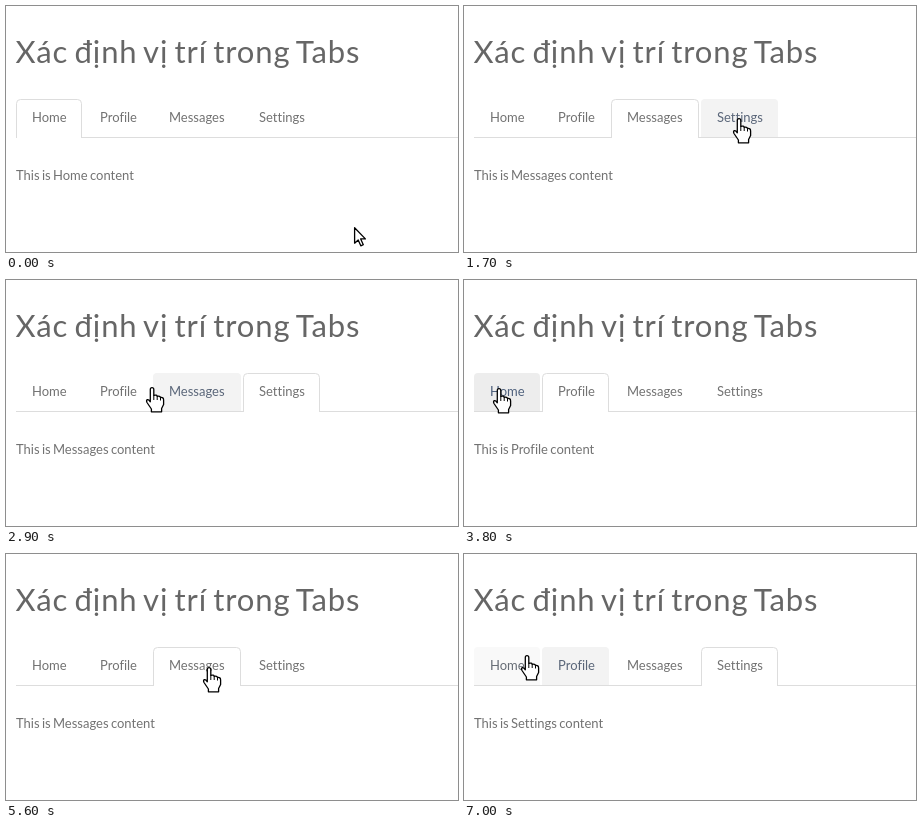
An HTML page that plays this animation: 452 by 246 pixels, repeating every 7100 ms.

```html
<!DOCTYPE html>
<html lang="vi">
<head>
<meta charset="utf-8">
<title>Tabs</title>
<style>
  html, body { margin: 0; width: 100%; height: 100%; overflow: hidden; background: #fff; }
  svg { display: block; width: 452px; height: 246px; }
  text { font: 13px Lato, "Open Sans", sans-serif; fill: #727272; font-variant-ligatures: none; }
  #content { word-spacing: -1px; }
  .title { font-size: 31px; letter-spacing: .9px; word-spacing: -2.6px; fill: #666; }
  .frame { fill: #fff; stroke: #ddd; }
  .cursor path { fill: #fff; stroke: #000; stroke-width: 1.3; stroke-linejoin: round; }
  .cursor .crease { fill: none; stroke-width: 1; }
</style>
</head>
<body>
<svg viewBox="0 0 452 246">
  <text class="title" x="9.5" y="57">Xác định vị trí trong Tabs</text>
  <path d="M10 131.5H452" stroke="#ddd"/>
  <g id="tabs"></g>
  <text id="content" x="10" y="174"></text>
  <g class="cursor" id="arrow">
    <path d="M.6 .8V16.2L4.2 12.9L6.8 18.8L9.3 17.7L6.7 11.9H11.4Z"/>
  </g>
  <g class="cursor" id="hand">
    <path d="M-1.7 13V2.6Q-1.7 .7 0 .7Q1.8 .7 1.8 2.6V8.4Q4.9 7.5 5.2 9.4Q8 8.6 8.5 10.5Q11.6 10 11.6 13V17.5L9.6 21.5V24.8H-.6V22L-5 15.5Q-6 13.4-4.6 12.7Q-3.4 12.2-1.7 14.8Z"/>
    <path class="crease" d="M1.8 8.4V13M5.2 9.4V13M8.5 10.5V13.5"/>
  </g>
</svg>
<script>
const LOOP = 7100, STEP = 100;
const PRESS = 200;     // from arriving on a tab to the click, which swaps the content
const LAG = 200;       // from the click to the tab itself changing
const FADE_STEPS = 3;  // length of the hover fade
const TOP = 93, BOTTOM = 131, GAP = 2;

// Where the pointer rests: it moves evenly from one stop to the next.
const stops = [
  { arrive: 0, leave: 0, x: 348, y: 221 },
  { arrive: 600, leave: 1300, x: 188, y: 116 },
  { arrive: 1700, leave: 2200, x: 275, y: 112 },
  { arrive: 2600, leave: 2800, x: 158, y: 107 },
  { arrive: 3200, leave: 3400, x: 108, y: 108 },
  { arrive: 3800, leave: 4000, x: 35, y: 108 },
  { arrive: 4200, leave: 4500, x: 112, y: 112 },
  { arrive: 4900, leave: 5500, x: 183, y: 112 },
  { arrive: 6000, leave: 6300, x: 284, y: 117 },
  { arrive: 7000, leave: LOOP, x: 63, y: 101 }
];

const $ = id => document.getElementById(id);
const mix = (a, b, k) => `rgb(${a.map((v, i) => Math.round(v + (b[i] - v) * k))})`;

function make(tag, attrs, parent) {
  const el = document.createElementNS('http://www.w3.org/2000/svg', tag);
  for (const key in attrs) el.setAttribute(key, attrs[key]);
  return parent.appendChild(el);
}

const outline = (left, right, top, bottom) =>
  `M${left} ${bottom}V${top + 4}a4 4 0 0 1 4-4H${right - 4}a4 4 0 0 1 4 4V${bottom}`;

function makeTab(name, x, w) {
  const back = make('path', { d: outline(x, x + w, TOP, BOTTOM) + 'Z' }, $('tabs'));
  const frame = make('path',
    { class: 'frame', d: outline(x + .5, x + w - .5, TOP + .5, BOTTOM + 1) }, $('tabs'));
  const label = make('text', { x: x + 16, y: 116 }, $('tabs'));
  label.textContent = name;
  return { name, x, w, back, frame, label };
}

let left = 10;
const tabs = Object.entries({ Home: 66, Profile: 67, Messages: 88, Settings: 77 })
  .map(([name, w]) => {
    const tab = makeTab(name, left, w);
    left += w + GAP;
    return tab;
  });

const tabAt = ({ x, y }) =>
  tabs.find(tab => y >= TOP && y <= BOTTOM && x >= tab.x && x < tab.x + tab.w);

const clicks = stops.slice(1).map(stop => ({ time: stop.arrive + PRESS, tab: tabAt(stop) }));
const chosen = t => clicks.filter(c => c.time <= t).pop()?.tab ?? tabs[0];

function pointer(t) {
  const i = stops.findLastIndex(s => s.arrive <= t);
  const a = stops[i], b = stops[i + 1] ?? a;
  const k = t > a.leave ? (t - a.leave) / (b.arrive - a.leave) : 0;
  return { x: a.x + (b.x - a.x) * k, y: a.y + (b.y - a.y) * k };
}

// Share of the latest steps that the pointer spent on the tab.
function hoverLevel(tab, t) {
  let inside = 0;
  for (let i = 0; i < FADE_STEPS; i++)
    if (tabAt(pointer(Math.max(0, t - i * STEP))) === tab) inside++;
  return inside / FADE_STEPS;
}

function draw(t) {
  const active = chosen(t - LAG);
  for (const tab of tabs) {
    const level = tab === active ? 0 : hoverLevel(tab, t);
    tab.back.style.fill = mix([255, 255, 255], [237, 237, 237], level);
    tab.label.style.fill = mix([114, 114, 114], [78, 96, 124], level);
    tab.frame.style.display = tab === active ? '' : 'none';
  }
  $('content').textContent = `This is ${chosen(t).name} content`;

  // The hand turns back into an arrow for a moment as the content is swapped.
  const spot = pointer(t);
  const swapping = clicks.some(c => t >= c.time && t < c.time + STEP);
  const overTabs = spot.y >= TOP && spot.y <= BOTTOM && spot.x < left;
  const isHand = overTabs && !swapping;
  $('hand').style.display = isHand ? '' : 'none';
  $('arrow').style.display = isHand ? 'none' : '';
  $(isHand ? 'hand' : 'arrow')
    .setAttribute('transform', `translate(${Math.round(spot.x)} ${Math.round(spot.y)})`);
}

const start = performance.now();
function tick() {
  const t = (performance.now() - start) % LOOP;
  draw(Math.floor(t / STEP) * STEP);
  requestAnimationFrame(tick);
}
tick();
</script>
</body>
</html>
```
